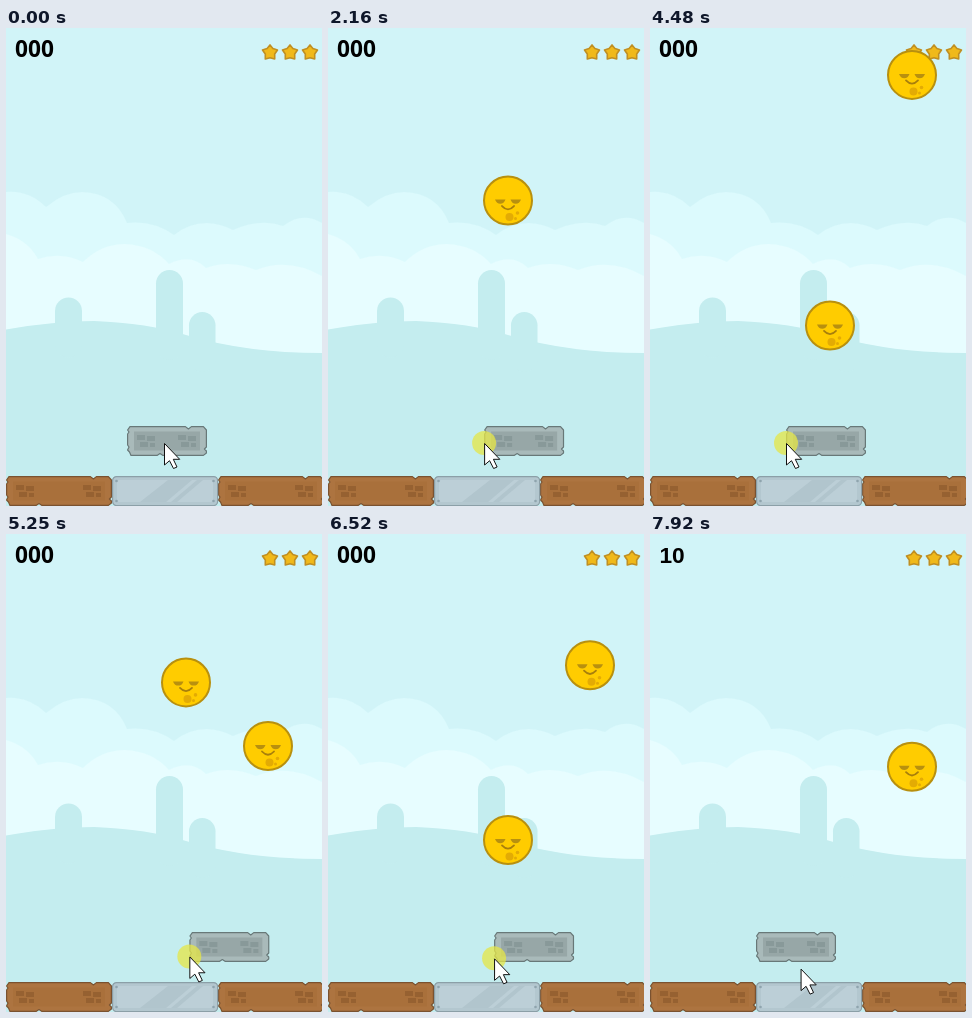
Animation, 316 px wide and 478 px high, one loop 7990 ms. Source, as an HTML page:

```html
<!DOCTYPE html>
<html lang="en">
<head>
<meta charset="utf-8">
<title>Bouncing balls</title>
<style>
  html, body { margin: 0; width: 100%; height: 100%; overflow: hidden; background: #d1f4f8; }
  svg { display: block; width: 316px; height: 478px; }
  text { font-weight: bold; font-size: 22.7px; }
</style>
</head>
<body>
<svg viewBox="0 0 316 478">
  <defs>
    <path id="star" d="M0-7.600 2.900-4 7.500-2.500 4.700 1.500 4.700 6.500 0 5.200 -4.700 6.500 -4.700 1.500 -7.500-2.500 -2.900-4Z"
      fill="#f0b91a" stroke="#c08f22" stroke-width="1.600" stroke-linejoin="round"/>
    <g id="ball">
      <circle r="24" fill="#fc0" stroke="#b8900f" stroke-width="2"/>
      <g fill="#e3ab04"><circle cx="1.500" cy="16.500" r="4"/><circle cx="9.500" cy="12.500" r="1.800"/><circle cx="7.500" cy="18" r="1.500"/></g>
      <path d="M-13-1H-2.500Q-4 3.200-7.700 3.200T-13-1ZM2.500-1H13Q11.500 3.200 7.700 3.200T2.500-1Z" fill="#b8900f"/>
      <path d="M-6 5.500Q0 12 6 5.500" fill="none" stroke="#a87f0c" stroke-width="1.800" stroke-linecap="round"/>
    </g>
    <path id="rubble" d="M0 0H8V5H0ZM10 1H18V6H10ZM3 7H11V12H3ZM13 8H18V12H13Z"/>
  </defs>

  <rect width="316" height="478" fill="#d1f4f8"/>
  <path fill="#dcfafd" d="M0 164Q23 162 40 179Q58 164 76 164Q109 165 121 195Q147 192 168 207Q183 195 201 195Q216 196 227 202Q254 190 277 198Q296 183 316 195V340H0Z"/>
  <path fill="#e7fdff" d="M0 206Q22 212 32 231Q55 223 77 234Q95 216 119 216Q146 217 163 236Q185 225 200 240Q224 231 250 242Q282 229 316 248V340H0Z"/>
  <g fill="#c4edef">
    <path d="M0 301.500Q48 293 88 293Q142 295 180 307Q240 325 316 325V478H0Z"/>
    <rect x="49" y="269.500" width="27" height="60" rx="13.500"/>
    <rect x="150" y="242" width="27" height="90" rx="13.500"/>
    <rect x="183" y="284" width="26.500" height="60" rx="13.250"/>
  </g>
  <text id="score" y="29"></text>
  <use href="#star" x="264" y="24.500"/><use href="#star" x="284" y="24.500"/><use href="#star" x="304" y="24.500"/>

  <g id="floor"></g>
  <g transform="translate(106 448)">
    <rect x=".6" y=".6" width="105" height="29" rx="4" fill="#b3c7cf" stroke="#8b9fa7" stroke-width="1.2"/>
    <rect x="5" y="4" width="96" height="22" rx="2" fill="#bccfd7"/>
    <path fill="#b1c5cd" d="M56 4H80L54 26H28ZM85 4H91L65 26H59Z"/>
    <g fill="#8fa4ad"><circle cx="4.500" cy="5" r="1.300"/><circle cx="101.500" cy="5" r="1.300"/><circle cx="4.500" cy="25" r="1.300"/><circle cx="101.500" cy="25" r="1.300"/></g>
  </g>
  <g id="paddle"></g>
  <use id="ballA" href="#ball"/>
  <use id="ballB" href="#ball"/>
  <g id="cursor">
    <circle id="press" r="12" fill="#e6e645" opacity=".75"/>
    <path d="M.5 .5V22L5.500 17.700 9.500 25.500 13 24 9.300 16.300H15.700Z" fill="#fff" stroke="#111"/>
  </g>
</svg>
<script>
const $ = id => document.getElementById(id);

// A chipped 30px high block with a recessed panel.
function brick(x, width, fill, edge, panel, rubble) {
  const w = width - .6;
  return `<g transform="translate(${x})">
    <path fill="${fill}" stroke="${edge}" stroke-width="1.2" stroke-linejoin="round"
      d="M3 .6H${w - 21}L${w - 18} 3 ${w - 15} .6H${w - 3}L${w} 4V21L${w - 2} 23 ${w} 25V27L${w - 3} 29.400H36L33 27.500 30 29.400H4L2.500 26 .6 24 2 21 .6 19V8L2 6 .6 4Z"/>
    <rect x="7" y="5.500" width="${width - 14}" height="19" fill="${panel}"/>
    <g fill="${rubble}"><use href="#rubble" x="10" y="9"/><use href="#rubble" x="${width - 29}" y="9"/></g></g>`;
}
const wood = ["#ad7440", "#7a5230", "#a9703b", "#966131"];
$("floor").innerHTML = brick(0, 106, ...wood) + brick(212, 106, ...wood);
$("floor").setAttribute("transform", "translate(0 448)");
$("paddle").innerHTML = brick(0, 80, "#a9baba", "#687878", "#97a7a7", "#889999");

// Cursor path: time in ms, x, y
const path = [
  [0, 158, 415], [350, 158, 415], [830, 164, 415], [1250, 167, 415], [1800, 167, 415],
  [2510, 146, 415], [2850, 136, 415], [4800, 136, 415], [5040, 151, 416], [5500, 221, 430],
  [5880, 218, 431], [6020, 207.5, 432], [6730, 148, 421], [7150, 122, 419], [7400, 106, 420],
  [7570, 106, 420], [7780, 135, 439], [7920, 151, 434.5]
];
const pressStart = 350, pressEnd = 7500;

function cursorAt(t) {
  const i = path.findIndex(p => p[0] > t);
  if (i < 0) return path.at(-1).slice(1);
  const [t0, x0, y0] = path[i - 1], [t1, x1, y1] = path[i];
  const k = (t - t0) / (t1 - t0);
  return [x0 + (x1 - x0) * k, y0 + (y1 - y0) * k];
}

// Each arc is [apex time in s, apex height]; the bounce is where two arcs cross.
const halfGravity = 156.5, lowest = 375;
const arcsA = [[.043, 33], [2.9, 88.7], [5.4845, 140]];
const arcsB = [[4.183, 33], [6.984, 96.7]];
const heightAt = (arcs, t) =>
  Math.min(lowest, ...arcs.map(([apex, y]) => y + halfGravity * (t / 1000 - apex) ** 2));

const place = (id, x, y) => $(id).setAttribute("transform", `translate(${x} ${y})`);
const show = (id, on) => $(id).setAttribute("visibility", on ? "visible" : "hidden");

const loop = 7990, step = 70.1, lastStep = 113, popTime = 6760;

function draw(now) {
  const n = Math.min(lastStep, Math.floor((now % loop + 15) / step));
  const t = Math.max(0, n * step - 5);
  const [x, y] = cursorAt(t);

  place("cursor", x, y);
  show("press", t >= pressStart && t < pressEnd);
  place("paddle", t < pressStart ? 121 : t < pressEnd ? x : 106, 398);

  place("ballA", 180, heightAt(arcsA, t));
  show("ballA", t > 50 && t < popTime);
  place("ballB", 262, heightAt(arcsB, t));
  show("ballB", t > 4190);

  const scored = t >= popTime, score = $("score");
  score.textContent = scored ? "10" : "000";
  score.setAttribute("x", scored ? 9.5 : 9);
  score.style.fontFamily = scored ? '"Liberation Sans", sans-serif' : '"Noto Sans", sans-serif';
}

let start;
function tick(now) {
  start ??= now;
  draw(now - start);
  requestAnimationFrame(tick);
}
draw(0);
requestAnimationFrame(tick);
</script>
</body>
</html>
```
